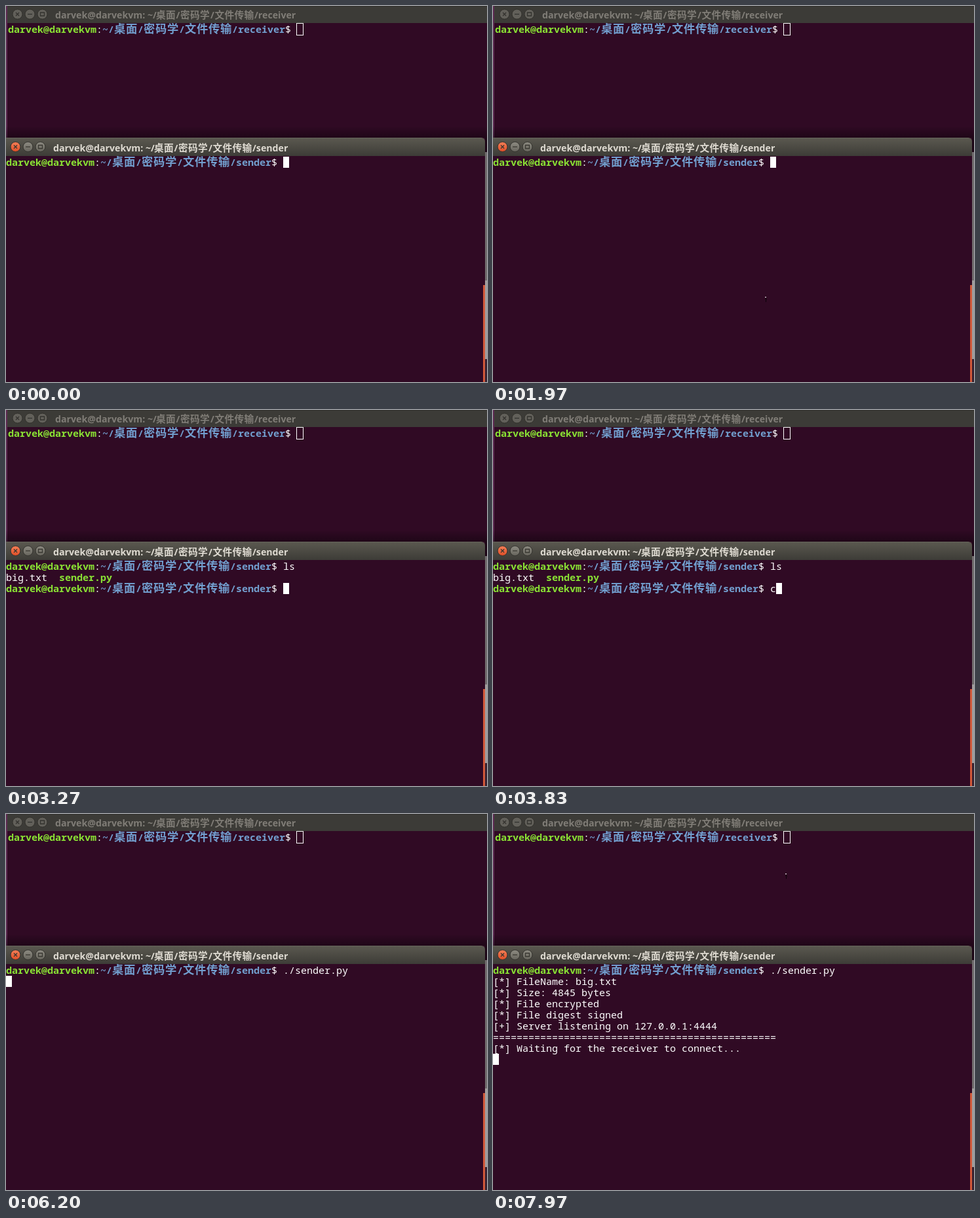
An HTML page that plays this animation: 734 by 574 pixels, repeating every 8000 ms.

```html
<!DOCTYPE html>
<html lang="zh-CN">
<head>
<meta charset="utf-8">
<title>File transfer terminals</title>
<style>
  html, body { margin: 0; width: 100%; height: 100%; overflow: hidden; background: #300a24; }
  svg { display: block; width: 734px; height: 574px; }
  text { white-space: pre; }
  .mono { font: 500 15px "Noto Sans Mono", "DejaVu Sans Mono", monospace; fill: #fff; }
  .title { font: bold 14.2px "Open Sans", "Noto Sans", sans-serif; }
  .cjk { font-family: "Noto Sans CJK SC", "Noto Sans CJK", "Noto Sans CJK JP", sans-serif; }
  .mono.green { fill: #8ae234; font-weight: bold; }
  .mono.blue { fill: #729fcf; font-weight: bold; }
  .mono.cjk { font-size: 17.33px; letter-spacing: .67px; }
  .title.cjk { font-size: 14.67px; letter-spacing: .33px; }
</style>
</head>
<body>
<svg id="stage" viewBox="0 0 734 574">
  <defs>
    <linearGradient id="bar" x2="0" y2="1">
      <stop stop-color="#5b5950"/><stop offset="1" stop-color="#3d3c37"/>
    </linearGradient>
    <linearGradient id="shade" x2="0" y2="1">
      <stop stop-color="#000" stop-opacity="0"/><stop offset="1" stop-color="#000" stop-opacity=".35"/>
    </linearGradient>
    <linearGradient id="close" x2="0" y2="1">
      <stop stop-color="#f37f57"/><stop offset="1" stop-color="#e04e27"/>
    </linearGradient>
    <linearGradient id="gray" x2="0" y2="1">
      <stop stop-color="#8d8b82"/><stop offset="1" stop-color="#67655d"/>
    </linearGradient>
  </defs>
</svg>
<script>
const LOOP = 8000, CELL = 9, ROW = 17, TOP = 230;
const USER = 'darvek', HOST = 'darvekvm';
const stage = document.getElementById('stage');

function add(parent, tag, attrs, content) {
  const el = document.createElementNS('http://www.w3.org/2000/svg', tag);
  for (const k in attrs) el.setAttribute(k, attrs[k]);
  if (content) el.textContent = content;
  parent.appendChild(el);
  return el;
}
const group = () => add(stage, 'g', {});
const rect = (parent, x, y, width, height, fill, more) =>
  add(parent, 'rect', { x, y, width, height, fill, ...more });
const mono = (parent, x, y, str, cls = '') =>
  add(parent, 'text', { x, y, class: 'mono ' + cls }, str);

// Shell prompt on the character grid; CJK glyphs take two cells
function prompt(parent, x, y, dir) {
  const put = (str, cls, wide) => {
    mono(parent, x, y, str, cls);
    x += str.length * CELL * (wide ? 2 : 1);
  };
  put(USER + '@' + HOST, 'green');
  put(':');
  put('~/', 'blue');
  ['桌面', '密码学', '文件传输'].forEach((part, i) => {
    if (i) put('/', 'blue');
    put(part, 'blue cjk', true);
  });
  put('/' + dir, 'blue');
  put('$');
}

function title(x, y, dir, fill) {
  const put = (dx, str, cls = '') =>
    add(stage, 'text', { x: x + dx, y, fill, class: 'title ' + cls }, str);
  put(0, `${USER}@${HOST}: ~/`);
  put(154, '桌面', 'cjk');
  put(184.5, '/');
  put(191, '密码学', 'cjk');
  put(237, '/');
  put(243.5, '文件传输', 'cjk');
  put(304, '/' + dir);
}

function buttons(x, y, active) {
  const ink = active ? '#383731' : '#33322e';
  for (let i = 0; i < 3; i++) {
    const cx = x + 19 * i;
    add(stage, 'circle', {
      cx, cy: y, r: 7.5, stroke: '#32312c',
      fill: active ? (i ? 'url(#gray)' : 'url(#close)') : '#62605a'
    });
    const d = ['m-2.5-2.5 5 5m0-5-5 5', 'm-3.5 0h7', 'm-3-2.5h6v5h-6z'][i];
    add(stage, 'path', { d: `M${cx} ${y}` + d, fill: 'none', stroke: ink, 'stroke-width': 1.3 });
  }
}

// Receiver window, behind
rect(stage, 0, 0, 734, 574, '#300a24');
rect(stage, 0, 0, 734, 26, '#3c3b37');
rect(stage, 0, 0, 734, 1, '#2e2d29');
rect(stage, 0, 0, 2, 201, '#5c2a52');
buttons(17.5, 12.5, false);
title(75, 19, 'receiver', '#807d77');
prompt(stage, 3, 41, 'receiver');
rect(stage, 443.5, 26.5, 10, 18, 'none', { stroke: '#fff' });

// Desktop edge on the right
rect(stage, 0, 183, 734, 18, 'url(#shade)');
rect(stage, 731, 201, 3, 22, '#1c0616');
rect(stage, 731, 223, 3, 196, '#6f6a6c');
rect(stage, 731, 419, 3, 120, '#a09d9c');
rect(stage, 731, 539, 3, 35, '#3a2230');

// Sender window, in front
rect(stage, 0, 229, 731, 345, '#300a24');
add(stage, 'path', { d: 'M0 229V201H725Q731 201 731 207V229Z', fill: 'url(#bar)' });
rect(stage, 0, 201, 726, 1, '#65635a');
rect(stage, 728, 426, 3, 148, '#d2583a');
buttons(14.5, 215, true);
title(72, 222, 'sender', '#dfdbd2');

const baseline = row => TOP + row * ROW + 14;
const INPUT = 47 * CELL;

prompt(stage, 0, baseline(0), 'sender');
const firstLine = mono(stage, INPUT, baseline(0), '');

const listing = group();
mono(listing, 0, baseline(1), 'big.txt');
mono(listing, 81, baseline(1), 'sender.py', 'green');
prompt(listing, 0, baseline(2), 'sender');
const secondLine = mono(listing, INPUT, baseline(2), '');

const report = group();
[
  '[*] FileName: big.txt',
  '[*] Size: 4845 bytes',
  '[*] File encrypted',
  '[*] File digest signed',
  '[+] Server listening on 127.0.0.1:4444',
  '='.repeat(48),
  '[*] Waiting for the receiver to connect...'
].forEach((line, i) => mono(report, 0, baseline(i + 1), line));

const caret = rect(stage, 0, 0, CELL, ROW, '#fff');
const pointer = group();
rect(pointer, -1, 0, 2, 1, '#fff');
rect(pointer, 0, 2, 1, 6, '#0c0209');
rect(pointer, -1, 3, 3, 2, '#1c0515');

// Typed text: [time, text so far]
const LS = [[2230, 'l'], [2370, 'ls']];
const CLEAR = [[3830, 'c'], [3970, 'cl'], [4130, 'cle'], [4230, 'clea'], [4370, 'clear']];
const RUN = [[5270, '.'], [5500, './'], [5630, './s'], [5830, './sender.py ']];
const LISTED = 2530, CLEARED = 4800, STARTED = 6200, REPORTED = 6670;

// Pointer paths: [time, x, y]
const ARRIVE = [[870, 712, 566], [1150, 560, 490], [1450, 398, 436], [1700, 416, 444]];
const LEAVE = [[7470, 416, 445], [7600, 362, 390], [7800, 400, 210], [7970, 447, 91]];

const typed = (keys, t) => keys.reduce((s, [at, str]) => t >= at ? str : s, '');

function along(path, t) {
  const last = path[path.length - 1];
  if (t >= last[0]) return last.slice(1);
  const i = path.findIndex(p => p[0] > t);
  const [a, b] = [path[i - 1], path[i]];
  const k = (t - a[0]) / (b[0] - a[0]);
  return [1, 2].map(j => Math.round(a[j] + (b[j] - a[j]) * k));
}

const show = (el, on) => el.setAttribute('visibility', on ? 'visible' : 'hidden');

function draw(t) {
  const listed = t >= LISTED && t < CLEARED;
  const first = typed(t < CLEARED ? LS : RUN, t);
  const second = typed(CLEAR, t);
  firstLine.textContent = first;
  secondLine.textContent = second;
  show(listing, listed);
  show(report, t >= REPORTED);

  let col = 47 + (listed ? second : first).length;
  let row = listed ? 2 : 0;
  if (t >= STARTED) {
    col = 0;
    row = t >= REPORTED ? 8 : 1;
  }
  caret.setAttribute('x', col * CELL);
  caret.setAttribute('y', TOP + row * ROW);

  const path = t >= LEAVE[0][0] ? LEAVE
    : t >= ARRIVE[0][0] && t < LS[0][0] ? ARRIVE : null;
  show(pointer, path);
  if (path) pointer.setAttribute('transform', `translate(${along(path, t)})`);
}

function tick() {
  draw(performance.now() % LOOP);
  requestAnimationFrame(tick);
}
tick();
</script>
</body>
</html>
```
